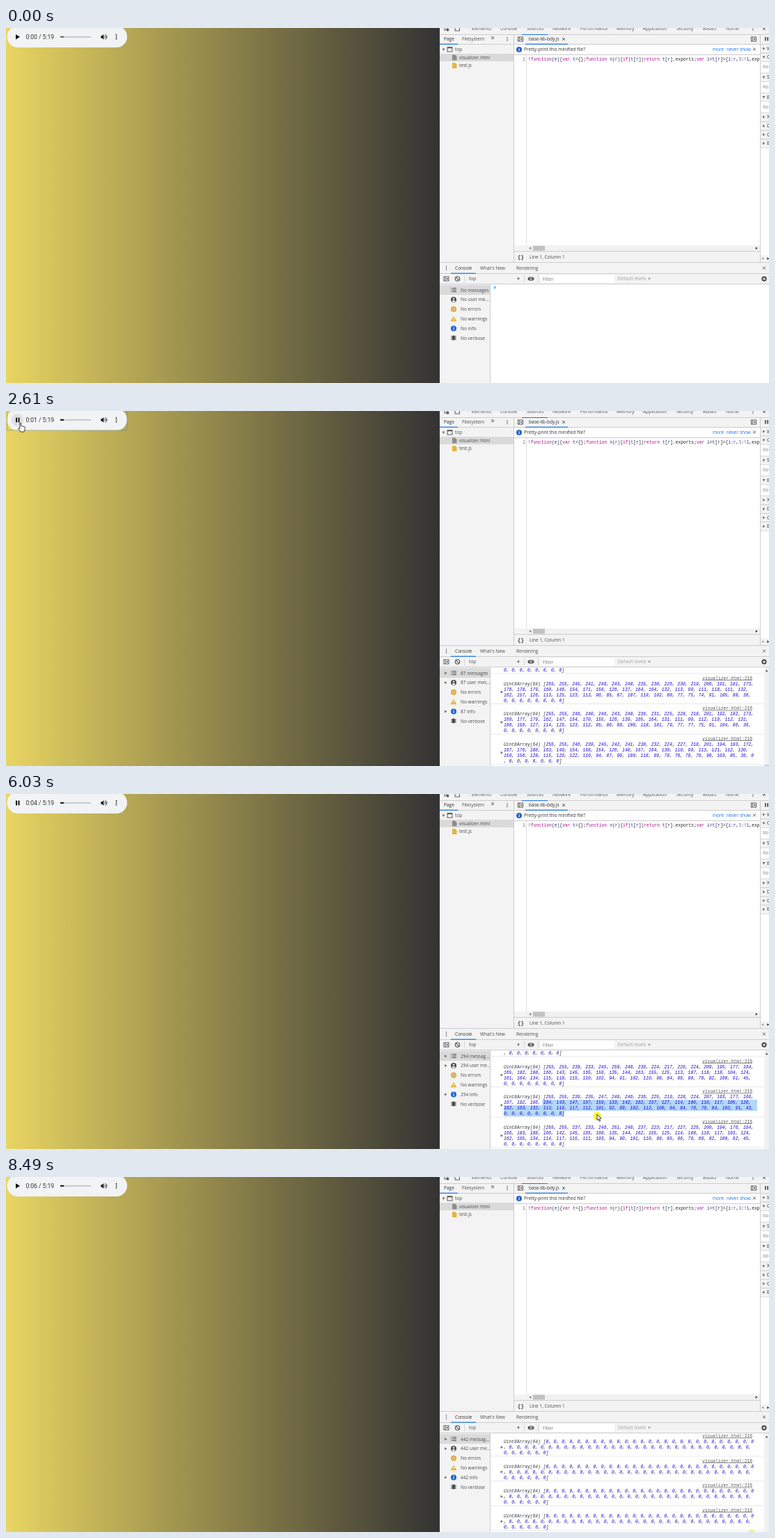
Recreate the animation shown at these times as an HTML page with a canvas. Size 1096 by 511 pixels, loop 8550 ms.

```html
<!DOCTYPE html>
<html lang="en">
<head>
<meta charset="utf-8">
<title>Audio console</title>
<style>
  html, body { margin: 0; width: 100%; height: 100%; overflow: hidden; }
  canvas { display: block; }
</style>
</head>
<body>
<canvas id="stage" width="1096" height="511"></canvas>
<script>
const c = document.getElementById('stage').getContext('2d');
const LOOP = 8550, PLAY = 1140, STEP = 77.4, PRESS = 3800, RESUME = 6900, PAUSE = 7300;
const UI = '6.55px "Open Sans", sans-serif';
const MONO = '6.3px "Liberation Mono", monospace';
const CHAR = 3.78, COLS = 95, LEFT = 715, LINE = 8;
const GREY = '#f3f3f3', EDGE = '#cdcdcd', INK = '#4c4c4c', BLUE = '#1a73e8';

// Spectrum logged as message REF; its neighbours drift away from it.
const REF = 158, FADE = 371;
const spectrum = [270, 265, 239, 235, 247, 249, 246, 236, 225, 219, 228, 224, 207, 193, 177, 166,
  167, 182, 186, 164, 143, 147, 167, 159, 133, 142, 162, 157, 127, 114, 106, 116, 117, 105, 126,
  162, 163, 132, 113, 119, 117, 112, 101, 92, 89, 102, 112, 100, 84, 84, 78, 70, 84, 102, 91, 43];

const countKeys = [[1180, 0], [1830, 39], [2610, 87], [4310, 190], [6016, 294], [7486, 382], [8490, 442]];
const cursorKeys = [[2760, 20.7, 17], [3700, 770, 444], [4150, 770, 444], [4310, 834, 445], [4700, 836, 449],
  [5500, 849, 461], [6100, 849, 461], [6560, 870, 490], [7150, 19, 15], [7330, 19, 15], [7486, 215.5, 90],
  [7650, 215.5, 90], [8420, 1071, 503], [8490, 1071, 512]];

function at(keys, t, ease = u => u) {
  const n = keys.findIndex(k => k[0] > t);
  if (n === 0) return keys[0].slice(1);
  if (n < 0) return keys[keys.length - 1].slice(1);
  const a = keys[n - 1], b = keys[n], u = ease((t - a[0]) / (b[0] - a[0]));
  return a.slice(1).map((v, i) => v + (b[i + 1] - v) * u);
}
const smooth = u => u * u * (3 - 2 * u);
const messageCount = t => Math.floor(at(countKeys, t)[0]);

function rect(x, y, w, h, color) { c.fillStyle = color; c.fillRect(x, y, w, h); }
function text(s, x, y, color = INK, font = UI, align = 'left') {
  c.font = font; c.fillStyle = color; c.textAlign = align;
  c.fillText(s, x, y + 2.3);
}
function disc(x, y, r, color) {
  c.fillStyle = color; c.beginPath(); c.arc(x, y, r, 0, 7); c.fill();
}
function ring(x, y, r, color, width = 1) {
  c.strokeStyle = color; c.lineWidth = width; c.beginPath(); c.arc(x, y, r, 0, 7); c.stroke();
}
function oval(x, y, rx, ry, color) {
  c.fillStyle = color; c.beginPath(); c.ellipse(x, y, rx, ry, 0, 0, 7); c.fill();
}
function poly(points, color, outline) {
  c.beginPath();
  for (let i = 0; i < points.length; i += 2) c.lineTo(points[i], points[i + 1]);
  c.closePath(); c.fillStyle = color; c.fill();
  if (outline) { c.strokeStyle = outline; c.lineWidth = .8; c.stroke(); }
}
function tri(x, y, dir, color = '#6e6e6e', s = 2) {
  c.save(); c.translate(x, y);
  c.rotate({ right: 0, down: 1, left: 2, up: 3 }[dir] * Math.PI / 2);
  poly([-s * .7, -s, s, 0, -s * .7, s], color);
  c.restore();
}
function dots(x, y, gap, r, color = INK) {
  for (let i = -1; i < 2; i++) disc(x, y + i * gap, r, color);
}
function cross(x, y) {
  c.strokeStyle = INK; c.lineWidth = .9; c.beginPath();
  c.moveTo(x - 2, y - 2); c.lineTo(x + 2, y + 2);
  c.moveTo(x + 2, y - 2); c.lineTo(x - 2, y + 2); c.stroke();
}
function panelIcon(x, y) {
  c.strokeStyle = INK; c.lineWidth = .9; c.strokeRect(x - 3.5, y - 3, 7, 6);
  rect(x - 1.8, y - 3, .8, 6, INK); tri(x + 1, y, 'left', INK, 1.5);
}
function info(x, y, r = 4) {
  disc(x, y, r, '#2364c6');
  rect(x - .5, y - .7, 1.1, 3, '#fff'); rect(x - .5, y - 2.3, 1.1, 1, '#fff');
}

function drawPlayer(t) {
  const playing = t >= PLAY && t < PAUSE;
  const focused = (t >= PLAY && t < PRESS) || (t >= 7230 && t < 8480);
  c.fillStyle = '#f1f3f4';
  c.beginPath(); c.roundRect(1.5, -3, 172.5, 31, 15.4); c.fill();
  const glow = focused ? 1 : t >= 830 && t < PLAY ? Math.min(1, (t - 780) / 220) : 0;
  disc(16.5, 12.8, 9, `rgba(205,208,211,${glow * .5})`);
  if (playing) { rect(14, 9.5, 2, 6.8, '#111'); rect(17.5, 9.5, 2, 6.8, '#111'); }
  else poly([14, 9.3, 14, 16.4, 20, 12.8], '#111');
  const seconds = t < PLAY ? 0 : Math.floor((Math.min(t, PAUSE) - 1150) / 1000);
  text(`0:0${Math.max(0, seconds)} / 5:19`, 28.5, 13.2, '#333', '8.5px Roboto, sans-serif');
  rect(78, 11.8, 44, 2, '#c6c8ca');
  rect(78, 11.8, 5, 2, t < PLAY ? '#666' : '#111');
  poly([136.3, 11.2, 138, 11.2, 140.3, 9, 140.3, 16.7, 138, 14.4, 136.3, 14.4], '#111');
  c.strokeStyle = '#111'; c.lineWidth = 1;
  for (const r of [1.8, 4]) { c.beginPath(); c.arc(140.8, 12.8, r, -1.1, 1.1); c.stroke(); }
  dots(158.5, 12.8, 2.8, .9, '#111');
  if (focused) {
    c.strokeStyle = 'rgba(95,125,150,.6)'; c.lineWidth = .8; c.strokeRect(1.5, -2, 172.3, 29.8);
  }
}

function drawSources() {
  rect(623, 0, 473, 511, GREY);
  [['Elements', 669], ['Console', 710], ['Sources', 748], ['Network', 785], ['Performance', 825], ['Memory', 877],
    ['Application', 915], ['Security', 963], ['Audits', 1001], ['Nomit', 1034]].forEach(([s, x]) => text(s, x, 1));
  c.strokeStyle = INK; c.lineWidth = .9; c.strokeRect(630, -3, 5, 6); c.strokeRect(645, -3, 6.5, 7);
  poly([632, 0, 637, 3, 634, 5], INK);
  dots(1073, 1, 2.3, .7); cross(1089, 1);
  rect(623, 9, 473, 1, EDGE); rect(741, 9, 37, 1, BLUE);

  text('Page', 629, 16, '#333'); text('Filesystem', 655, 16); text('»', 696.5, 15, INK, '10px "Open Sans", sans-serif');
  dots(720, 16, 2.3, .75);
  rect(623, 23, 473, 1, EDGE); rect(623, 22.6, 26, 1.2, BLUE);
  panelIcon(739, 16); text('base-lib-bdy.js', 751, 16, '#333'); cross(801, 16);
  rect(746, 22.6, 61, 1.2, BLUE); panelIcon(1074, 16);
  rect(1090, 13, 1.7, 5.5, INK); rect(1093.3, 13, 1.7, 5.5, INK);

  tri(628.5, 31, 'down'); c.strokeRect(634, 28, 7, 6); rect(634, 27.5, 7, 1.7, INK);
  text('top', 645, 31);
  rect(623, 37, 106, 11, '#dadada');
  [['visualizer.html', 42.5, '#8c8c8c'], ['test.js', 54, '#e0b640']].forEach(([s, y, color]) => {
    poly([641, y - 4, 645, y - 4, 647.5, y - 1.5, 647.5, y + 4, 641, y + 4], color);
    text(s, 651, y);
  });
  rect(729, 10, 1, 328, EDGE);

  rect(730, 24, 353, 289, '#fff');
  info(737, 31); text('Pretty-print this minified file?', 744, 31, '#333');
  text('more', 1015, 31, BLUE); text('never show', 1035, 31, BLUE); cross(1075, 30.5);
  rect(730, 38, 353, 1, EDGE); rect(747, 39, 1, 274, '#ddd');
  text('1', 742, 45, '#666', MONO);
  drawCode('!function(e){var t={};function n(r){if(t[r])return t[r].exports;var i=t[r]={i:r,l:!1,exp');
  rect(748, 313, 335, 8, '#f1f1f1'); rect(757, 313.5, 17, 7, '#c1c1c1');
  tri(753, 317, 'left', '#777', 1.8); tri(1078, 317, 'right', '#333', 1.8);
  rect(730, 321, 353, 1, EDGE);
  text('{}', 735, 330, '#333', 'bold 7.3px "Liberation Mono", monospace'); text('Line 1, Column 1', 752, 330);

  rect(1083, 10, 1, 328, EDGE); rect(1084, 172, 12, 155, '#fff');
  [['W', 29.5], ['C', 42, 1], ['S', 71, 1], ['B', 99.5, 1], ['X', 128], ['D', 141], ['G', 153.5], ['E', 166]]
    .forEach(([s, y, open]) => {
      if (open) {
        rect(1084, y + 6, 12, 16, '#fff');
        text('No', 1087, y + 14, '#888', 'italic ' + UI);
      }
      rect(1084, y - 6.3, 12, .7, EDGE); rect(1084, y + 6, 12, .7, EDGE);
      tri(1088.5, y, open ? 'down' : 'right'); text(s, 1093, y, '#333');
    });
  tri(1087, 332, 'left', '#999', 1.8); tri(1094.5, 332, 'right', '#333', 1.8);
}

function drawCode(code) {
  let col = 0;
  for (const part of code.split(/(\b(?:function|var|if|return)\b|\b\w\b)/)) {
    const color = /^(function|var|if|return)$/.test(part) ? '#aa0d91' : /^\w$/.test(part) ? '#25309c' : '#222';
    text(part, 750 + col * CHAR, 45, color, MONO);
    col += part.length;
  }
  rect(1084, 39, 12, 9, GREY);
}

// The last dot of the ellipsis may overhang.
function fit(s, width) {
  c.font = UI;
  if (c.measureText(s).width <= width) return s;
  while (c.measureText(s + '..').width > width) s = s.slice(0, -1);
  return s + '...';
}

function drawDrawer(count) {
  rect(623, 337, 473, 1, EDGE);
  dots(632.5, 345.5, 2.4, .75);
  text('Console', 645, 345.5, '#333'); text("What's New", 681, 345.5); text('Rendering', 733, 345.5); cross(1089, 345.5);
  rect(623, 353, 473, 1, EDGE); rect(639, 352.6, 36, 1.2, BLUE);
  panelIcon(632.5, 361); ring(648.5, 361, 3.2, INK, 1.1);
  c.beginPath(); c.moveTo(646.2, 358.7); c.lineTo(650.8, 363.3); c.stroke();
  for (const x of [658, 744, 764]) rect(x, 356, .8, 10, EDGE);
  text('top', 665, 361); tri(736, 361, 'down');
  oval(754, 361, 4.5, 2.8, INK); ring(754, 361, 1.5, '#fff', .8);
  rect(768, 355.5, 106, 11.5, '#fff'); text('Filter', 771, 361.5, '#777');
  text('Default levels', 878.5, 361, '#a3a3a3'); tri(924, 361, 'down', '#a3a3a3');
  ring(1089, 361, 2.4, INK, 1.6);
  for (let i = 0; i < 8; i++) disc(1089 + 3.5 * Math.cos(i * Math.PI / 4), 361 + 3.5 * Math.sin(i * Math.PI / 4), .8, INK);
  rect(623, 368, 473, 1, EDGE);

  rect(623, 370, 72, 14, '#dadada');
  const n = count || 'No';
  [n + ' messages', n + ' user messages', 'No errors', 'No warnings', n + ' info', 'No verbose'].forEach((s, i) => {
    const y = 377.2 + i * 13.8;
    text(fit(s, 41.8), 653, y);
    if (count && [0, 1, 4].includes(i)) tri(631.5, y, 'right');
  });
  for (let i = -1; i < 2; i++) { rect(639, 376.6 + i * 2.4, 1, 1, INK); rect(641, 376.6 + i * 2.4, 6, 1, INK); }
  disc(643, 391, 4, INK); disc(643, 389.7, 1.3, GREY); oval(643, 393.2, 2.4, 1.2, GREY);
  disc(643, 404.8, 4, '#d9a33c'); ring(643, 404.8, 2, '#f6e2b3', .8);
  poly([643, 414.5, 647.3, 422.3, 638.7, 422.3], '#e3b02f');
  rect(642.6, 417, 1, 3, '#fff'); rect(642.6, 420.6, 1, 1, '#fff');
  info(643, 432.4);
  oval(643, 446, 2.3, 3.6, INK);
  for (let i = -1; i < 2; i++) rect(639.2, 445.6 + i * 2.2, 7.6, .9, INK);
  rect(695, 369, 1, 142, EDGE); rect(696, 369, 400, 142, '#fff');
}

// After the pause every bin sinks by 7 per message, high bins from a lower level.
function values(k) {
  const level = Math.min(k, FADE), drift = Math.min(7, 2.5 * Math.abs(level - REF)), fade = Math.max(0, k - FADE);
  return Array.from({ length: 64 }, (_, i) => {
    if (!spectrum[i]) return 0;
    const loud = Math.min(255, spectrum[i] + drift * Math.sin(level * .21 + i * 7.3));
    return Math.max(0, Math.round(loud - (fade && fade * 7 + i * i * .07)));
  });
}

function wrap(k) {
  const lines = [[]];
  let col = 0;
  const put = s => {
    if (col + s.trimEnd().length > COLS) { lines.push([]); col = 0; }
    lines[lines.length - 1].push([s, col]);
    col += s.length;
  };
  put('Uint8Array(64) [');
  values(k).forEach((v, i) => { put(String(v)); put(i < 63 ? ', ' : ']'); });
  return lines;
}

function drawMessages(count, selection) {
  c.save(); c.beginPath(); c.rect(696, 369, 400, 142); c.clip();
  if (!count) text('›', 700.5, 374, BLUE, 'bold 9px "Open Sans", sans-serif');
  let bottom = Math.min(508.7, 369 + count * 43.6);
  for (let k = count; k > 0 && bottom > 369; k--) {
    const lines = wrap(k), top = bottom - 11.6 - lines.length * LINE;
    rect(696, bottom - .4, 393, .8, '#e4e4e4');
    if (selection && k === count - 1) drawSelection(lines, top, selection);
    text('visualizer.html:216', 1072, top + 6.4, '#545454', MONO, 'right');
    rect(1000, top + 9.3, 72, .6, '#545454');
    tri(712, top + 10.6 + lines.length * LINE / 2, 'right');
    lines.forEach((line, i) => line.forEach(([s, col]) =>
      text(s, LEFT + col * CHAR, top + 14.6 + i * LINE, /\d$/.test(s) ? '#1c00cf' : '#303942', 'italic ' + MONO)));
    bottom = top;
  }
  if (count > 3) {
    rect(1089, 369, 7, 142, '#f1f1f1'); tri(1092.7, 374, 'up', '#555', 1.8);
    rect(1089.5, 515 - 140 * 3.4 / count, 6, 140, '#c1c1c1');
  }
  c.restore();
}

function drawSelection(lines, top, [x, y]) {
  const last = Math.max(1, Math.min(lines.length - 1, Math.floor((y - top - 10.6) / LINE)));
  for (let i = 1; i <= last; i++) {
    const [s, col] = lines[i][lines[i].length - 1];
    const from = i === 1 ? 770 : LEFT, to = i < last ? 1079 : Math.min(y > 455 ? 1079 : x, LEFT + (col + s.length) * CHAR);
    rect(from, top + 10.6 + i * LINE, Math.max(0, to - from), LINE, '#b3d7fb');
  }
}

function cursorAt(t) {
  if (t < 830) return t >= 130 && t < 210 ? [1023, 499] : t >= 210 && t < 290 ? [597.5, 280.5] : null;
  return at(cursorKeys, t, smooth);
}

function drawCursor(t, x, y) {
  const pressed = (t >= PRESS && t < 6300) || (t >= 7230 && t < 7320) || t >= 8480;
  if (pressed) disc(x, y + 2, 6, 'rgba(255,240,0,.72)');
  c.save(); c.translate(x, y);
  if (x < 174 && y < 28) {
    poly([-.8, .3, .6, .3, .9, 4.5, 3, 4.9, 6.3, 6, 6.7, 8.5, 5.2, 13, .2, 13, -3.2, 8.3, -2.4, 7.4, -.9, 8.5],
      '#fff', '#111');
  } else {
    poly([0, 0, 0, 8.6, 2, 6.9, 3.3, 10.3, 4.7, 9.7, 3.4, 6.4, 6, 6.2], '#fff', '#111');
  }
  c.restore();
}

const backdrop = c.createLinearGradient(0, 0, 623, 0);
backdrop.addColorStop(0, '#e8d562');
backdrop.addColorStop(1, '#333333');

function draw() {
  const now = performance.now() % LOOP;
  const t = now < PLAY ? now : PLAY + Math.floor((now - PLAY + 8) / STEP) * STEP;
  const count = messageCount(t), held = t >= PRESS && t < RESUME;
  const cursor = cursorAt(t);
  rect(0, 0, 623, 511, backdrop);
  drawPlayer(t);
  drawSources();
  drawDrawer(count);
  drawMessages(held ? messageCount(PRESS) : count, held && t > 4150 && at(cursorKeys, Math.min(t, 6100), smooth));
  if (cursor) drawCursor(t, ...cursor);
  requestAnimationFrame(draw);
}
draw();
</script>
</body>
</html>
```
